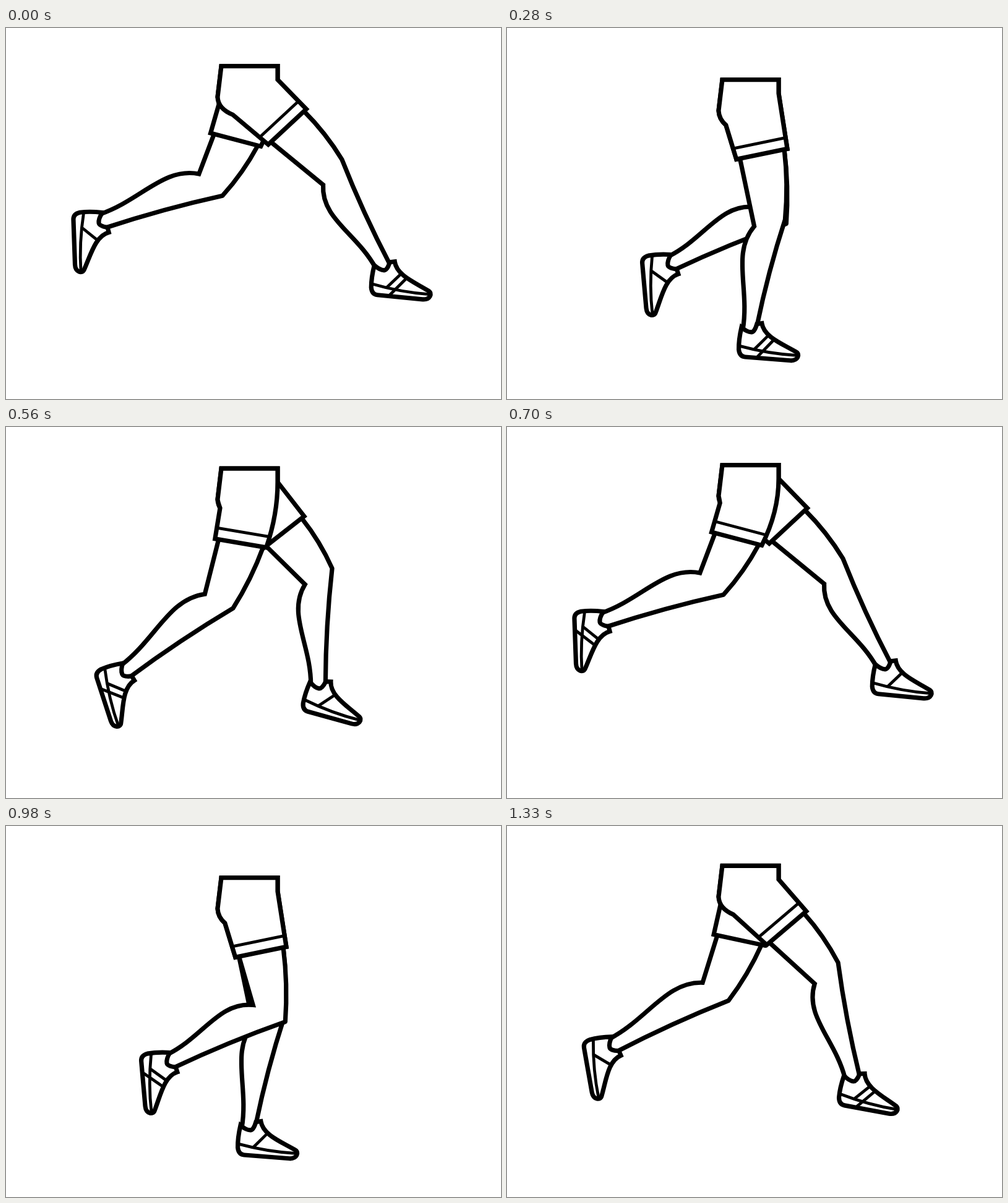
These frames come from a looping animation (800x600 px, 1400 ms). An HTML page with a canvas:

```html
<!DOCTYPE html>
<html lang="en">
<head>
<meta charset="utf-8">
<title>Running legs</title>
<style>
html, body { margin: 0; width: 100%; height: 100%; overflow: hidden; background: #fff; }
canvas { display: block; }
</style>
</head>
<body>
<canvas id="stage" width="800" height="600"></canvas>
<script>
const ctx = document.getElementById('stage').getContext('2d');
const STEP = 70, CYCLE = 20, BOLD = 7.2, FINE = 4.8;
const HIP_X = 394, HIP_DROP = 33, HEM_DROP = 89, HEM_HALF = 42;

// Joint angles (degrees) and bone lengths, evenly spread over one stride
const STRIDE = {
  thigh: [51.6, 35.2, 16, 4.7, -8, -14, 1, 16, 30, 46],
  shin: [17, -2, -22, -47, -63.5, -82, -101.5, -75, -41, -11],
  foot: [0, -18.5, -1, 35, 66.5, 82.5, 102.5, 79.5, 29, 10],
  thighLength: [190, 191, 201, 196, 195, 182, 212, 208, 199, 185],
  shinLength: [179, 193, 188, 194, 199, 196, 198, 193, 198, 187]
};

function sample(track, phase) {
  const at = phase / CYCLE * track.length, i = Math.floor(at);
  const from = track[i], to = track[(i + 1) % track.length];
  return from + (to - from) * (at - i);
}

function waistAt(phase) {
  const p = phase % 10, low = 83.6;
  if (p <= 4) return low - 5.5 * (4 - p);
  return p <= 6 ? low - 5.5 * (p - 4) : low - 11 - 2.75 * (p - 6);
}

const mix = (a, b, t) => [a[0] + (b[0] - a[0]) * t, a[1] + (b[1] - a[1]) * t];

// Angle 0 points down, positive angles swing forward
function polar([x, y], degrees, length) {
  const a = degrees * Math.PI / 180;
  return [x + length * Math.sin(a), y + length * Math.cos(a)];
}

// Point at a share of the way from a to b, pushed sideways by some pixels
function beside(a, b, along, push) {
  const dx = b[0] - a[0], dy = b[1] - a[1], len = Math.hypot(dx, dy);
  const p = mix(a, b, along);
  return [p[0] - dy / len * push, p[1] + dx / len * push];
}

function poseAt(phase, top) {
  const joint = name => sample(STRIDE[name], phase);
  const thigh = joint('thigh'), shin = joint('shin');
  const hip = [HIP_X, top + HIP_DROP];

  const tilt = 0.88 * thigh - 2.5;
  const hem = polar(hip, tilt, HEM_DROP);
  const knee = polar(hip, thigh, joint('thighLength'));
  const creaseTurn = 0.335 * thigh + 0.75 * shin + 23.5;
  const kneeWidth = 51 + 0.3 * Math.max(0, thigh - shin - 65);

  return {
    top, knee,
    hemFront: polar(hem, tilt + 90, HEM_HALF),
    hemBack: polar(hem, tilt - 90, HEM_HALF),
    crease: polar(knee, creaseTurn - 90, kneeWidth),
    heel: polar(knee, shin, joint('shinLength')),
    angle: joint('foot') * Math.PI / 180
  };
}

function onFoot(pose, x, y) {
  const c = Math.cos(pose.angle), s = Math.sin(pose.angle);
  return [pose.heel[0] + x * c - y * s, pose.heel[1] + x * s + y * c];
}

function paint(path, width, fill, join = 'miter') {
  if (fill) {
    ctx.fillStyle = '#fff';
    ctx.fill(path);
  }
  if (width) {
    ctx.lineWidth = width;
    ctx.lineJoin = join;
    ctx.strokeStyle = '#000';
    ctx.stroke(path);
  }
}

function line(a, b) {
  const path = new Path2D();
  path.moveTo(...a);
  path.lineTo(...b);
  paint(path, FINE);
}

function drawLeg(pose) {
  const { hemFront, hemBack, knee, crease } = pose;
  const thighFront = mix(hemFront, hemBack, 0.06);
  const thighBack = mix(hemBack, hemFront, 0.07);
  const shin = onFoot(pose, 25, -2), calf = onFoot(pose, 2, 4);

  const traceFront = path => {
    path.quadraticCurveTo(...beside(thighFront, knee, 0.5, -6), ...knee);
    path.quadraticCurveTo(...beside(knee, shin, 0.5, 5), ...shin);
  };
  const traceBack = path => {
    path.bezierCurveTo(...beside(calf, crease, 0.4, 4),
      ...beside(calf, crease, 0.72, -32), ...crease);
    path.lineTo(...thighBack);
  };

  const body = new Path2D();
  body.moveTo(...thighFront);
  traceFront(body);
  body.lineTo(...calf);
  traceBack(body);
  paint(body, 0, true);

  const front = new Path2D();
  front.moveTo(...thighFront);
  traceFront(front);
  paint(front, BOLD, false, 'round');

  const back = new Path2D();
  back.moveTo(...calf);
  traceBack(back);
  paint(back, BOLD);
}

function drawShoe(pose, twoStripes) {
  ctx.save();
  ctx.translate(...pose.heel);
  ctx.rotate(pose.angle);

  const shoe = new Path2D();
  shoe.moveTo(0, 0);
  shoe.quadraticCurveTo(-5, 20, -5, 36);
  shoe.quadraticCurveTo(-4, 47, 5, 48);
  shoe.lineTo(78, 55);
  shoe.bezierCurveTo(90, 56, 95, 45, 87, 41);
  shoe.bezierCurveTo(64, 27, 36, 16, 33, -6);
  shoe.lineTo(25, -5);
  shoe.quadraticCurveTo(21, 8, 16, 8);
  shoe.quadraticCurveTo(9, 8, 0, 0);
  shoe.closePath();
  paint(shoe, BOLD, true);

  const sole = new Path2D();
  sole.moveTo(-4, 30);
  sole.quadraticCurveTo(44, 44, 90, 47);
  paint(sole, FINE);

  line([42, 15], [20, 36]);
  if (twoStripes) line([51, 22], [25, 48]);
  ctx.restore();
}

function drawShorts(pose, banded) {
  const { top, hemFront, hemBack } = pose;
  const swing = hemBack[0] - 338;
  const seat = [346 + 0.24 * swing,
    top + 64 + 0.36 * swing - 0.0022 * swing * swing];

  const shorts = new Path2D();
  shorts.moveTo(348, top);
  shorts.lineTo(439, top);
  shorts.lineTo(439, top + 22);
  shorts.quadraticCurveTo(439 + Math.max(0, hemFront[0] - 439) / 2,
    (top + 22 + hemFront[1]) / 2, ...hemFront);
  shorts.lineTo(...hemBack);
  shorts.lineTo(...seat);
  shorts.quadraticCurveTo(342.5, seat[1] - 10, 342, top + 50);
  shorts.closePath();
  paint(shorts, BOLD, true);

  if (banded) {
    line(beside(hemFront, hemBack, 0, 18), beside(hemFront, hemBack, 1, 18));
  }
}

function drawSide(phase, top, near) {
  const pose = poseAt(phase, top);
  drawLeg(pose);
  // The far shoe shows its second stripe only just after landing
  drawShoe(pose, near || (phase >= 2 && phase < 4));
  drawShorts(pose, near);
}

function render() {
  const phase = Math.floor(performance.now() / STEP) % CYCLE;
  const top = waistAt(phase);
  ctx.fillStyle = '#fff';
  ctx.fillRect(0, 0, 800, 600);
  drawSide((phase + CYCLE / 2) % CYCLE, top, false);
  drawSide(phase, top, true);
  requestAnimationFrame(render);
}
render();
</script>
</body>
</html>
```
